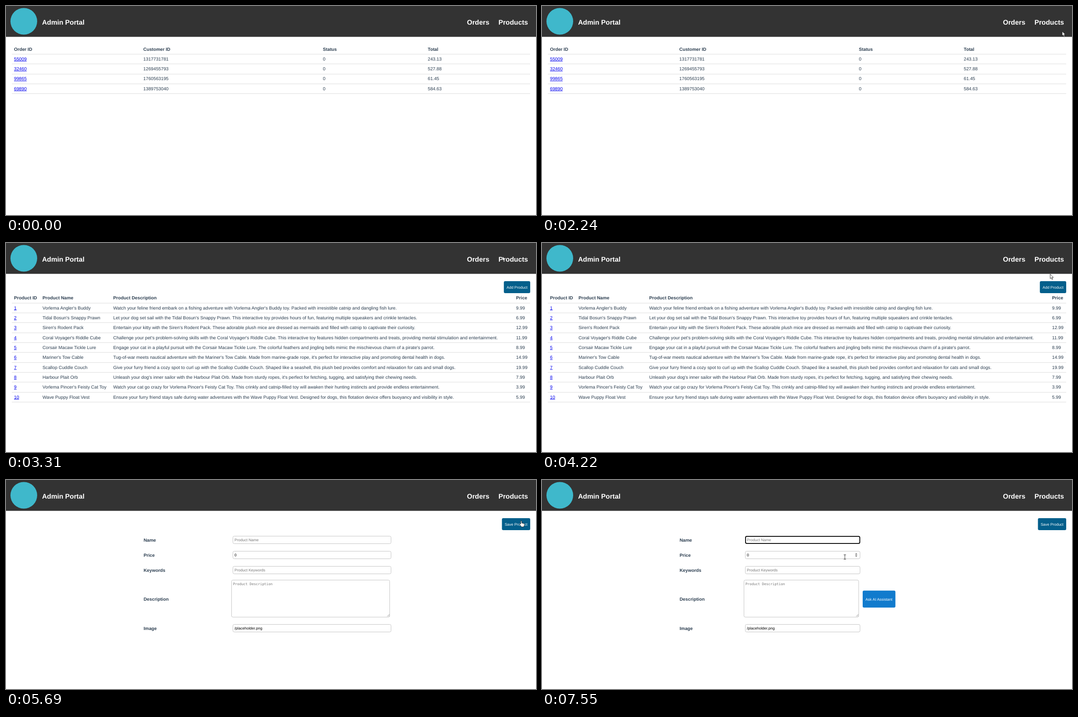
An HTML page that plays this animation: 1190 by 471 pixels, repeating every 8000 ms.

```html
<!DOCTYPE html>
<html lang="en">
<head>
<meta charset="utf-8">
<title>Admin Portal</title>
<style>
  html, body { margin: 0; width: 100%; height: 100%; overflow: hidden; background: #fff; }
  svg { display: block; }
  text { font: 10.21px "Liberation Sans", Arial, sans-serif; fill: #2c3e50; text-rendering: geometricPrecision; }
  .bold { font-weight: bold; }
  .nav { font-size: 15.3px; font-weight: bold; fill: #fff; }
  .link { fill: #00e; text-decoration: underline; }
  .small { font-size: 8.51px; fill: #000; }
  .hint { font-size: 8.51px; fill: #757575; }
  .mono { font: 7.78px "DejaVu Sans Mono", monospace; fill: #757575; }
  .caption { font-size: 8.51px; fill: #fff; }
  .field { fill: #fff; stroke: #c4c4c4; }
  .rule { stroke: #ddd; }
</style>
</head>
<body>
<svg id="stage" width="1190" height="471" viewBox="0 0 1190 471"></svg>
<script>
const LOOP = 8000;
const ROW = 22.33;
const stage = document.getElementById('stage');

function add(parent, tag, attrs = {}, content) {
  const el = document.createElementNS('http://www.w3.org/2000/svg', tag);
  for (const name in attrs) el.setAttribute(name, attrs[name]);
  if (content !== undefined) el.textContent = content;
  parent.appendChild(el);
  return el;
}
const group = (parent = stage) => add(parent, 'g');
const label = (parent, x, y, str, cls = '') => add(parent, 'text', { x, y, class: cls }, str);
const box = (parent, x, y, width, height, attrs) =>
  add(parent, 'rect', { x, y, width, height, rx: 3, ...attrs });

function button(parent, x, y, w, h, str, fill) {
  box(parent, x, y, w, h, { fill });
  label(parent, x + 6.2, y + h / 2 + 3.1, str, 'caption');
}

// First column holds links; top is the rule under the headings.
function table(parent, top, columns, heads, rows) {
  const rule = y => {
    const line = Math.floor(y) + 0.5;
    add(parent, 'path', { d: `M13 ${line}H1177`, class: 'rule' });
  };
  heads.forEach((str, i) => label(parent, columns[i], top - 7.8, str, 'bold'));
  rule(top);
  rows.forEach((cells, r) => {
    const y = top + r * ROW;
    cells.forEach((str, i) => label(parent, columns[i], y + 14.4, str, i ? '' : 'link'));
    rule(y + ROW);
  });
}

function form(x, w) {
  const g = group();
  const line = (y, name, str, cls) => {
    label(g, 309, y + 3.6, name, 'bold');
    box(g, x + 0.5, y - 8.5, w, 17, { class: 'field' });
    label(g, x + 4, y + 3, str, cls);
  };
  button(g, 1113.5, 86, 63.5, 27, 'Save Product', '#045f8b');
  line(135, 'Name', 'Product Name', 'hint');
  line(169, 'Price', '0', 'small');
  line(203, 'Keywords', 'Product Keywords', 'hint');
  label(g, 309, 271.6, 'Description', 'bold');
  box(g, x - 2.5, 225.5, w, 83.5, { class: 'field' });
  label(g, x + 0.7, 236.8, 'Product Description', 'mono');
  const right = x + w - 4;
  add(g, 'path', { d: `M${right - 4} 307.5l5-5M${right - 1} 307.5l2-2`, stroke: '#777', 'stroke-width': 0.8 });
  line(334, 'Image', '/placeholder.png', 'small');
  return g;
}

// Header
box(stage, 0, 0, 1190, 69.5, { rx: 0, fill: '#333' });
add(stage, 'circle', { cx: 40, cy: 34.5, r: 30, fill: '#3fb8cb' });
label(stage, 81, 42.3, 'Admin Portal', 'nav');
label(stage, 1035, 42.3, 'Orders', 'nav');
label(stage, 1105.7, 42.3, 'Products', 'nav');

// Pages
const orders = group();
table(orders, 108.35, [18, 308.3, 711.5, 947], ['Order ID', 'Customer ID', 'Status', 'Total'], [
  ['55009', '1317731781', '0', '243.13'],
  ['32460', '1269455793', '0', '527.88'],
  ['99865', '1760563195', '0', '61.45'],
  ['69890', '1389753040', '0', '584.63']
]);

const goods = [
  ["Vorlema Angler's Buddy", '9.99', 'Watch your feline friend embark on a fishing adventure with @ toy. Packed with irresistible catnip and dangling fish lure.'],
  ["Tidal Bosun's Snappy Prawn", '6.99', 'Let your dog set sail with the @. This interactive toy provides hours of fun, featuring multiple squeakers and crinkle tentacles.'],
  ["Siren's Rodent Pack", '12.99', 'Entertain your kitty with the @. These adorable plush mice are dressed as mermaids and filled with catnip to captivate their curiosity.'],
  ["Coral Voyager's Riddle Cube", '11.99', "Challenge your pet's problem-solving skills with the @. This interactive toy features hidden compartments and treats, providing mental stimulation and entertainment."],
  ['Corsair Macaw Tickle Lure', '8.99', "Engage your cat in a playful pursuit with the @. The colorful feathers and jingling bells mimic the mischievous charm of a pirate's parrot."],
  ["Mariner's Tow Cable", '14.99', "Tug-of-war meets nautical adventure with the @. Made from marine-grade rope, it's perfect for interactive play and promoting dental health in dogs."],
  ['Scallop Cuddle Couch', '19.99', 'Give your furry friend a cozy spot to curl up with the @. Shaped like a seashell, this plush bed provides comfort and relaxation for cats and small dogs.'],
  ['Harbour Plait Orb', '7.99', "Unleash your dog's inner sailor with the @. Made from sturdy ropes, it's perfect for fetching, tugging, and satisfying their chewing needs."],
  ["Vorlema Pincer's Feisty Cat Toy", '3.99', 'Watch your cat go crazy for @. This crinkly and catnip-filled toy will awaken their hunting instincts and provide endless entertainment.'],
  ['Wave Puppy Float Vest', '5.99', 'Ensure your furry friend stays safe during water adventures with the @. Designed for dogs, this flotation device offers buoyancy and visibility in style.']
];
const products = group();
button(products, 1117.8, 86, 59.2, 27, 'Add Product', '#045f8b');
table(products, 135.25, [18, 82, 240.8, 1145.3],
  ['Product ID', 'Product Name', 'Product Description', 'Price'],
  goods.map(([name, price, about], i) => [String(i + 1), name, about.replace('@', name), price]));

const wideForm = form(509, 355);
const aiForm = form(456, 257.5);
button(aiForm, 720, 249.3, 73.5, 38.2, 'Ask AI Assistant', '#117bcd');
const focus = group(aiForm);
box(focus, 457, 127, 256.5, 16, { fill: 'none', stroke: '#111', 'stroke-width': 2 });
const caret = add(aiForm, 'path', { d: 'M460 130.5v9', stroke: '#000', 'stroke-width': 0.8 });
const spinner = add(aiForm, 'path', { d: 'M703 168l2.5-3 2.5 3zM703 170l2.5 3 2.5-3z', fill: '#666' });

// Pointer
const click = add(stage, 'circle', { r: 8.2, fill: 'rgba(255,240,0,.5)' });
const pointer = group();
const outline = { fill: '#fff', stroke: '#111', 'stroke-width': 0.8, 'stroke-linejoin': 'round' };
const shapes = {
  arrow: add(pointer, 'path', { d: 'M0 .3V10.3L2.3 8.2 4 12.2 5.8 11.4 4.1 7.6H7.2Z', ...outline }),
  hand: add(pointer, 'path', {
    d: 'M-1 7V1.2a1.1 1.1 0 0 1 2.2 0V5l4 .8q1.6.4 1.6 2V10.5q0 2.8-3 3.2H1.5Q-.3 13.2-1.2 11.4L-3.2 8.4q-.6-1.4.8-1.6Z',
    ...outline
  }),
  beam: add(pointer, 'path', { d: 'M-2.5-5H2.5M0-5V5M-2.5 5H2.5', stroke: '#222', 'stroke-width': 0.9 })
};

// Each stroke: start, end, shape, then the stops as x, y pairs spread evenly in time.
const strokes = [
  [640, 830, 'arrow', [1181, 447, 1177, 402, 1170, 356, 1167, 335]],
  [1030, 1030, 'arrow', [1164.8, 335.3]],
  [1900, 2500, 'arrow', [1170, 312, 1178, 250, 1181, 172, 1177, 104, 1168, 57, 1156, 25, 1141, 8, 1125, 12, 1113, 22]],
  [2570, 2570, 'hand', [1108, 28]],
  [2710, 2850, 'hand', [1110, 29, 1113, 30, 1115, 30]],
  [3310, 3310, 'arrow', [1115, 30]],
  [3910, 3910, 'hand', [1115, 30]],
  [4050, 4278, 'arrow', [1119, 36, 1129, 52, 1141, 70, 1150, 82]],
  [4354, 4430, 'hand', [1155, 89, 1156.8, 92]],
  [6030, 6466, 'arrow', [1140, 94, 1080, 102, 985, 112, 875, 121, 780, 127, 720, 130]],
  [6553, 6640, 'beam', [688, 131, 672, 131.5]],
  [6960, 7060, 'beam', [672, 131.5, 673, 167]],
  [7270, 7550, 'beam', [675, 175, 678, 177, 679, 175, 680, 174, 680, 173.5]]
];
const stops = strokes.flatMap(([from, to, shape, path]) => {
  const count = path.length / 2;
  return Array.from({ length: count }, (_, i) => ({
    t: from + (count > 1 ? (to - from) * i / (count - 1) : 0),
    x: path[2 * i], y: path[2 * i + 1], shape
  }));
});
const clicks = [[3040, 3170], [5220, 5690], [6960, 7060]];

const show = (el, on) => { el.style.display = on ? '' : 'none'; };
const within = (t, from, to) => t >= from && t < to;

function draw(now) {
  const t = now % LOOP;
  show(orders, t < 3310);
  show(products, within(t, 3310, 5690));
  show(wideForm, within(t, 5690, 6030));
  show(aiForm, t >= 6030);
  show(focus, t >= 6960);
  show(caret, within(t, 6960, 7460));
  show(spinner, t >= 7060);

  const stop = stops.filter(s => s.t <= t + 0.01).pop();
  show(pointer, stop);
  show(click, stop && clicks.some(([from, to]) => within(t, from, to)));
  if (stop) {
    pointer.setAttribute('transform', `translate(${stop.x} ${stop.y})`);
    click.setAttribute('cx', stop.x);
    click.setAttribute('cy', stop.y);
    for (const name in shapes) show(shapes[name], name === stop.shape);
  }
}

const start = performance.now();
function tick() {
  draw(performance.now() - start);
  requestAnimationFrame(tick);
}
tick();
</script>
</body>
</html>
```
